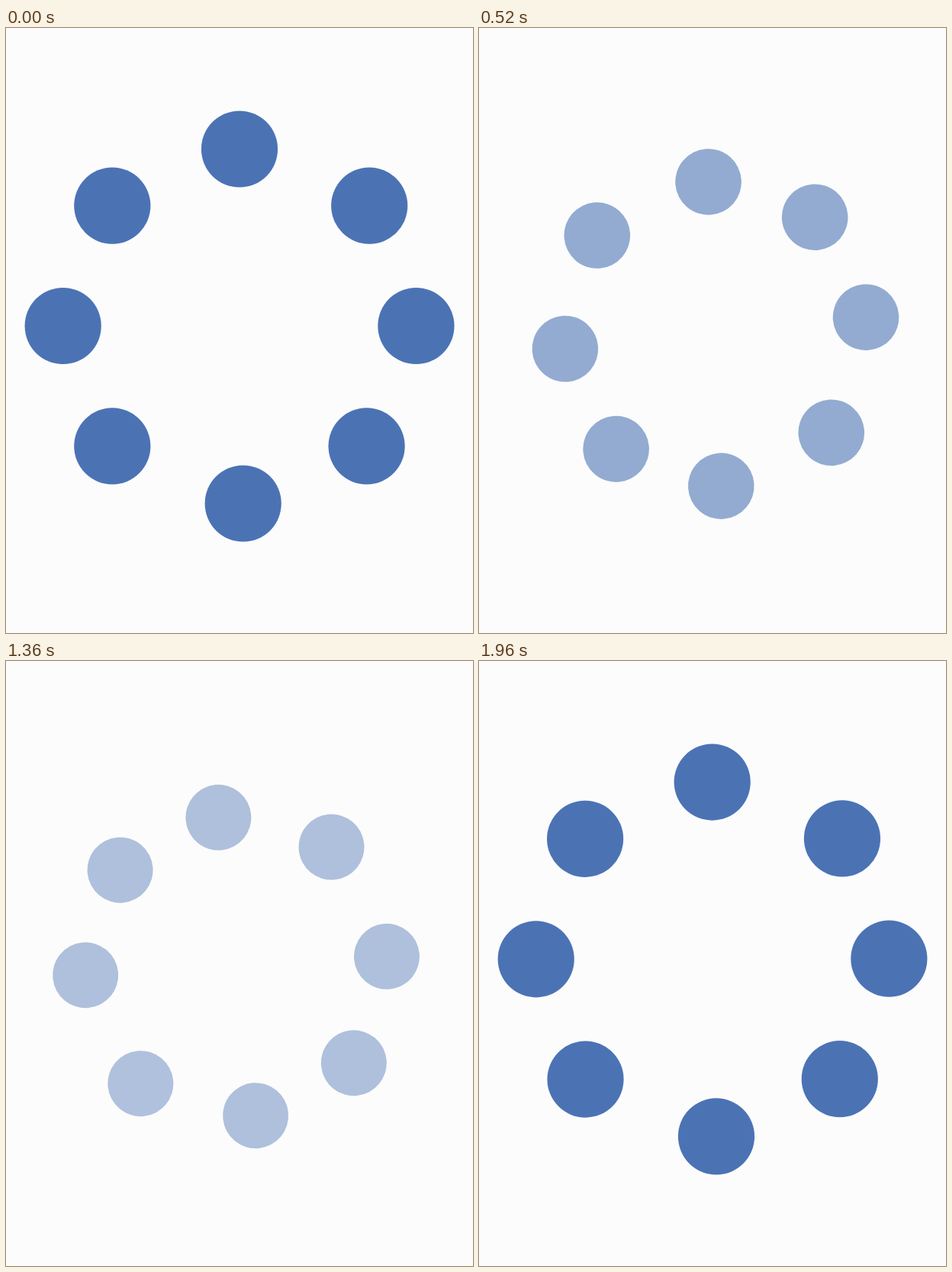
Animation of 612x792 px, one loop 2 s. Source, as an HTML page:

```html
<!DOCTYPE html>
<html lang="en">
<head>
<meta charset="utf-8">
<title>Dot spinner</title>
<style>
  html, body { margin: 0; width: 100%; height: 100%; overflow: hidden; background: #fcfcfc; }
  svg { display: block; width: 100%; height: 100%; }
</style>
</head>
<body>
<svg viewBox="0 0 612 792">
  <g id="ring" fill="#4b73b4">
    <circle r="50.1" cx="0" cy="-237.5"/>
    <circle r="50.1" cx="170.2" cy="-163.4"/>
    <circle r="50.1" cx="231.4" cy="-6"/>
    <circle r="50.1" cx="166.6" cy="151.4"/>
    <circle r="50.1" cx="4.7" cy="226.5"/>
    <circle r="50.1" cx="-166.7" cy="151.4"/>
    <circle r="50.1" cx="-231.3" cy="-6"/>
    <circle r="50.1" cx="-166.7" cy="-163.4"/>
  </g>
</svg>
<script>
  const LOOP = 2000, STEP = 40;
  const ring = document.getElementById('ring');

  const mix = (a, b, k) => a + (b - a) * k;
  const clamp = v => Math.min(1, Math.max(0, v));
  const curve = (p, q, s) => 3 * p * s * (1 - s) ** 2 + 3 * q * s * s * (1 - s) + s ** 3;

  // Cubic Bezier easing, solved by bisection
  function bezier(x1, y1, x2, y2) {
    return u => {
      if (u <= 0 || u >= 1) return clamp(u);
      let lo = 0, hi = 1;
      for (let i = 0; i < 30; i++) {
        const mid = (lo + hi) / 2;
        if (curve(x1, x2, mid) < u) lo = mid; else hi = mid;
      }
      return curve(y1, y2, lo);
    };
  }

  const soft = bezier(1 / 3, 0, 2 / 3, 1);
  const shrink = {
    start: 0, end: 837, angle: [0, 180], scale: [1, 0.8], alpha: [1, 0.225],
    turn: bezier(0.513, 0, 0.495, 1), fade: bezier(1 / 3, 0, 2 / 3, 2 / 3)
  };
  const grow = {
    start: 1020, end: 1976, angle: [180, 360], scale: [0.8, 1], alpha: [0.225, 1],
    turn: bezier(0.515, 0, 0.524, 1), fade: bezier(0.45, 0, 0.5, 1)
  };

  function draw(now) {
    // The motion runs at 25 pictures a second
    const t = Math.floor((now + 1) / STEP) * STEP % LOOP;
    const move = t < grow.start ? shrink : grow;
    const u = clamp((t - move.start) / (move.end - move.start));
    const angle = mix(...move.angle, move.turn(u));
    const scale = mix(...move.scale, soft(u));
    ring.setAttribute('transform', `translate(306 396) rotate(${angle}) scale(${scale})`);
    ring.setAttribute('opacity', mix(...move.alpha, move.fade(u)));
  }

  function tick(now) {
    draw(now);
    requestAnimationFrame(tick);
  }

  draw(0);
  requestAnimationFrame(tick);
</script>
</body>
</html>
```
